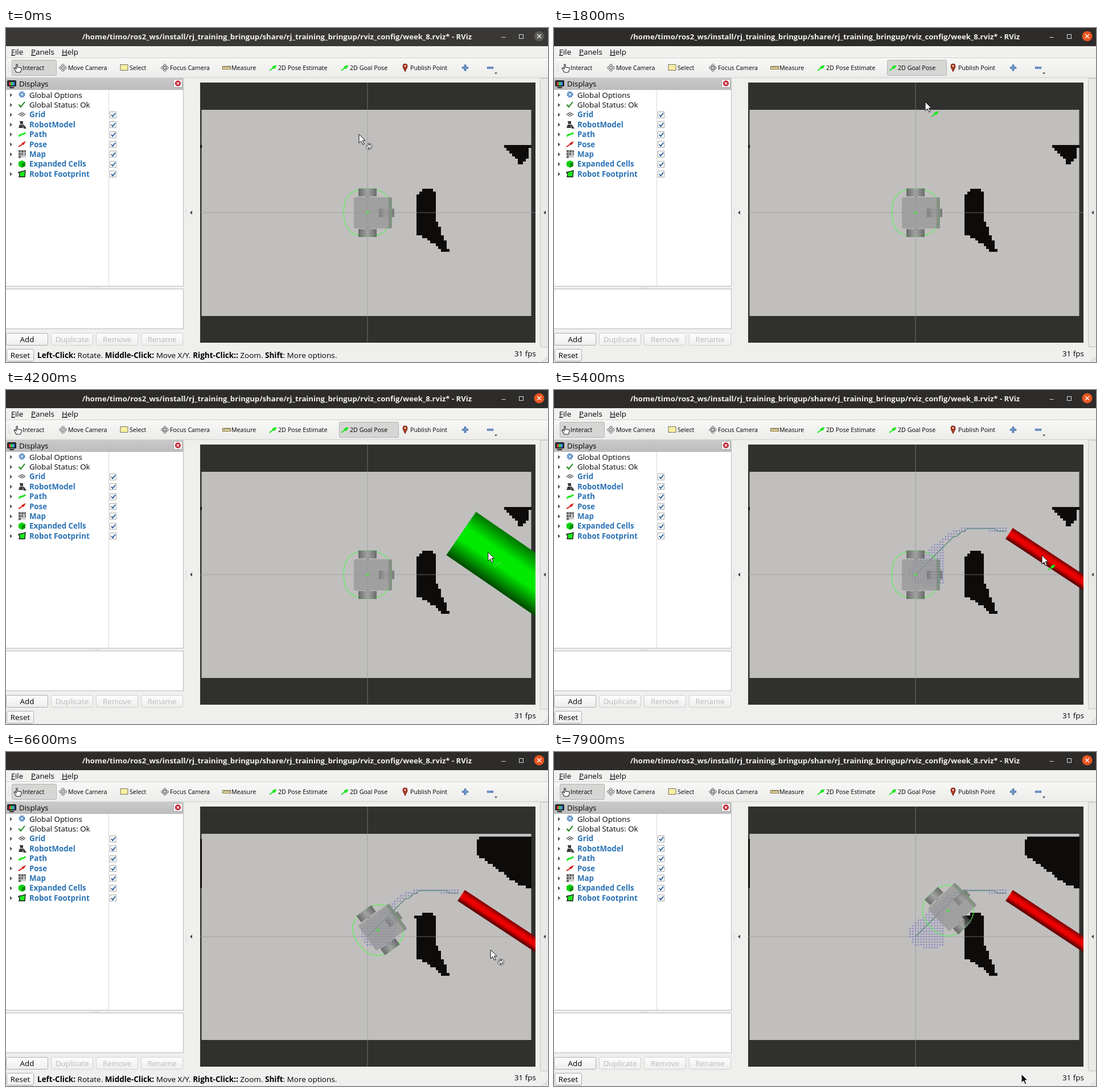
Write an HTML page that moves like this. It is 952 px wide and 588 px high and loops after 8000 ms.

```html
<!DOCTYPE html>
<html lang="en">
<head>
<meta charset="utf-8">
<title>Robot viewer</title>
<style>
html, body { margin: 0; width: 100%; height: 100%; overflow: hidden; background: #efefee; }
svg { display: block; width: 952px; height: 588px; }
text { font: 13.33px "Open Sans", "Noto Sans", sans-serif; fill: #000; white-space: pre; }
.small { font-size: 10.67px; }
.title { font-size: 13.15px; font-weight: 700; fill: #f2f1ef; }
.tip { font-size: 13.5px; }
.b { font-weight: 700; }
.link { font-weight: 700; fill: #2a72b5; }
.off { fill: #b9b9b9; }
.mid { text-anchor: middle; }
.u { text-decoration: underline; }
.crisp { shape-rendering: crispEdges; }
</style>
</head>
<body>
<svg viewBox="0 0 952 588" xmlns="http://www.w3.org/2000/svg">
  <defs>
    <clipPath id="viewClip"><rect x="341" y="96" width="589" height="458"/></clipPath>
    <linearGradient id="bar" x2="0" y2="1"><stop stop-color="#f8f8f7"/><stop offset="1" stop-color="#ececeb"/></linearGradient>
    <linearGradient id="btn" x2="0" y2="1"><stop stop-color="#fdfdfd"/><stop offset="1" stop-color="#eeeeed"/></linearGradient>
    <linearGradient id="head" x2="0" y2="1"><stop stop-color="#cacaca"/><stop offset="1" stop-color="#bcbcbc"/></linearGradient>
    <linearGradient id="wheel"><stop stop-color="#4b4b4b"/><stop offset=".5" stop-color="#9a9a9a"/><stop offset="1" stop-color="#4b4b4b"/></linearGradient>
    <linearGradient id="caster"><stop stop-color="#686868"/><stop offset=".45" stop-color="#929292"/><stop offset="1" stop-color="#606060"/></linearGradient>
    <linearGradient id="tube" x2="0" y2="1"><stop stop-opacity=".5"/><stop offset=".35" stop-opacity="0"/><stop offset=".6" stop-opacity="0"/><stop offset="1" stop-opacity=".7"/></linearGradient>
    <g id="pose"><path d="M-6 5L6-4" stroke="#1ee61e" stroke-width="2"/><path d="M-2-1L2-4 6-4 4 1 1 2z" fill="#1ee61e"/></g>
    <path id="arrow" d="M0 0V15.5L3.7 12 6.6 18.2 9 17 6.2 11H11z"/>
    <path id="cross" d="M0-7l3 3h-2v3h3v-2l3 3-3 3v-2h-3v3h2l-3 3-3-3h2v-3h-3v2l-3-3 3-3v2h3v-3h-2z" fill="#eee" stroke="#666"/>
  </defs>

  <rect width="952" height="588" fill="#efefee"/>
  <rect id="titleBar" width="952" height="32"/>
  <text class="title mid" x="476" y="20">/home/timo/ros2_ws/install/rj_training_bringup/share/rj_training_bringup/rviz_config/week_8.rviz* - RViz</text>
  <path d="M870.500 16.500h7" stroke="#ddd"/>
  <rect x="901.500" y="11.500" width="7" height="7" fill="none" stroke="#ddd"/>
  <circle id="close" cx="936.500" cy="14.500" r="9"/>
  <path d="M933 11l7 7m0-7l-7 7" stroke="#fff" stroke-width="1.300"/>
  <rect y="32" width="952" height="21" fill="#f1f1f0"/>
  <text x="9" y="46.500"><tspan class="u">F</tspan>ile</text>
  <text x="44" y="46.500"><tspan class="u">P</tspan>anels</text>
  <text x="98" y="46.500"><tspan class="u">H</tspan>elp</text>
  <rect y="52" width="952" height="35" fill="url(#bar)"/>
  <path d="M0 52.500H952M0 87.500H952" stroke="#cfcfce"/>
  <path d="M4.500 61v18M7.500 61v18" stroke="#bbb" stroke-dasharray="1 2"/>
  <g id="buttons" stroke="#b3b3b3"></g>
  <g id="tools">
    <path d="M17 76l-3-5 2-1 2 2v-8h2v5l7 1v4l-2 4h-7z" fill="#fff" stroke="#222" stroke-width="1.100"/>
    <use href="#cross" x="100" y="70"/>
    <use href="#cross" x="279" y="70"/>
    <circle cx="279" cy="70" r="3.500" fill="none" stroke="#777"/>
    <rect x="201" y="64.500" width="13" height="10" fill="#f7f0a0" stroke="#333" stroke-dasharray="2 1"/>
    <rect x="380.500" y="67.500" width="14" height="5" fill="#ead9a0" stroke="#77683a"/>
    <path d="M383 69h10" stroke="#554" stroke-width="2" stroke-dasharray="1 2"/>
    <use href="#pose" x="469" y="70"/>
    <use href="#pose" x="595" y="70"/>
    <path d="M701 77C699 72 697 70 697 67a4 4 0 0 1 8 0c0 3-2 5-4 10z" fill="#a83a20" stroke="#7c2412"/>
    <circle cx="701" cy="67" r="1.400" fill="#fff"/>
    <path d="M801 70h11m-5.500-5.500v11M845 70h11" stroke="#3465a4" stroke-width="3.600"/>
    <path d="M802 70h9m-4.500-4.500v9M846 70h9" stroke="#86a9d6" stroke-width="1.300"/>
    <path d="M858 78.500h5l-2.500 3z" fill="#444"/>
  </g>

  <g id="panel">
    <rect y="88" width="312" height="21" fill="url(#head)"/>
    <rect x="2.500" y="92.500" width="15" height="10" rx="1" fill="#1c2a33" stroke="#222"/>
    <path d="M5 98h3" stroke="#e33" stroke-width="6"/><path d="M8 98h4" stroke="#3c5" stroke-width="6"/><path d="M12 98h3" stroke="#48f" stroke-width="6"/>
    <path d="M6 105h8" stroke="#222" stroke-width="2"/>
    <text x="23" y="103">Displays</text>
    <rect x="294.500" y="90.500" width="15" height="14" rx="2" fill="#f6f6f6" stroke="#aaa"/>
    <circle cx="302" cy="97.500" r="5" fill="#c3202f"/><path d="M300 95.500l4 4m0-4l-4 4" stroke="#fff" stroke-width="1.200"/>
    <rect x="-.5" y="108.500" width="312" height="346" fill="#fff" stroke="#b9b9b8"/>
    <path d="M180.500 109v345" stroke="#d9d9d9"/>
    <path d="M149 457.500h16" stroke="#aaa" stroke-dasharray="1 2"/>
    <rect x="-.5" y="459.500" width="312" height="70" fill="#fff" stroke="#b9b9b8"/>
    <circle cx="28" cy="117" r="4.200" fill="#dce9f7" stroke="#4a80bd" stroke-width="2.600" stroke-dasharray="2.400 .9"/>
    <circle cx="28" cy="117" r="2.600" fill="#dce9f7" stroke="#4a80bd"/>
    <path d="M22.500 135l3.500 4 7-9" fill="none" stroke="#178417" stroke-width="2"/>
    <path d="M22 152l6-3.500 6 3.500-6 3.500zM25 150.200l6 3.500m0-3.500l-6 3.500" fill="none" stroke="#444"/>
    <path d="M24 164h6v5h-5zM22 176l2-6h5l1 6zM29 169l3 2 4 6h-5z" fill="#3a3a3a"/>
    <path d="M23 191c3-7 6 0 11-7" fill="none" stroke="#1ee61e" stroke-width="3"/>
    <path d="M22 209l8-5" stroke="#d21010" stroke-width="2"/><path d="M27 203l8-4-4 7z" fill="#d21010"/>
    <path d="M22 215h13v13h-13z" fill="#ccc"/>
    <path d="M22 217h13M22 222h8M22 227h5M33 222h2" stroke="#6a6a6a" stroke-width="4" stroke-dasharray="4 1"/>
    <path d="M22 236l6-3 6 3v7l-6 3-6-3z" fill="#0bd00b"/><path d="M28 239l6-3v7l-6 3z" fill="#078a07"/>
    <path d="M22 254l5-1 7-2-1 11H23l1-4z" fill="#1ee61e" stroke="#111" stroke-width="1.300"/>
  </g>

  <path d="M316.500 319v13" stroke="#aaa" stroke-dasharray="1 2"/>
  <rect x="938.500" y="88.500" width="14" height="473" rx="2" fill="#e9e9e8" stroke="#c2c2c1"/>
  <path d="M327 321.500v7l-4-3.500zM948 321.500v7l-4-3.500z" fill="#444"/>

  <g clip-path="url(#viewClip)">
    <rect x="340" y="96" width="590" height="458" fill="#30302f"/>
    <rect x="343.500" y="144" width="579" height="363" fill="#c0bfbe"/>
    <path id="cells" class="crisp" fill="#0d0c0b"/>
    <path d="M340 325H930M635 96V554" stroke="#929292" stroke-opacity=".65"/>
    <g id="plan">
      <path id="dots" fill="#7c7cc8" fill-opacity=".65"/>
      <path d="M635 325L702 258H707L716 249.500H720L726 244H774L779 248.500H794" fill="none" stroke="#4b8068" stroke-width="1.200"/>
    </g>
    <g id="robot">
      <path id="foot" fill="none" stroke="#55f455" stroke-width="1.500" stroke-dasharray="4 1"/>
      <g opacity=".72">
        <path d="M-2-30h5v5h-5zM-2 25h5v5h-5z" fill="#777"/>
        <rect x="-16" y="-42.500" width="32" height="14" fill="url(#wheel)"/>
        <rect x="-16" y="29" width="32" height="14" fill="url(#wheel)"/>
        <rect x="-24" y="-27" width="67" height="55" rx="3" fill="#959595"/>
        <path d="M37-27h3q3 0 3 3v49q0 3-3 3h-3z" fill="#747d74"/>
        <rect x="20" y="-7" width="27" height="15" fill="url(#caster)"/>
      </g>
      <path d="M42.500-9V10" stroke="#69d469" stroke-opacity=".5" stroke-dasharray="3 2"/>
      <circle r="2" fill="#8d8" stroke="#3fcf3f" stroke-width="1.200"/>
    </g>
    <g id="goal"><rect id="shaft" width="460"/><rect id="shade" width="460" fill="url(#tube)"/></g>
  </g>

  <text id="help" class="tip" x="55" y="581"><tspan class="b">Left-Click:</tspan> Rotate. <tspan class="b">Middle-Click:</tspan> Move X/Y. <tspan class="b">Right-Click::</tspan> Zoom. <tspan class="b">Shift</tspan>: More options.</text>
  <text id="hint" class="tip" x="55" y="581">Click and drag mouse to set position/orientation.</text>
  <text x="893" y="578">31 fps</text>
  <path d="M943 587l8-8m-4 8l4-4" stroke="#bbb"/>

  <g id="cursor">
    <use id="pointer" href="#arrow"/>
    <use id="poseIcon" href="#pose" x="17" y="21"/>
    <g id="orbit" transform="translate(18 21.500)">
      <circle r="5.500" fill="#eee" stroke="#555"/>
      <path d="M-3 1A3 3 0 0 1 1-3M3-1A3 3 0 0 1-1 3" fill="none" stroke="#444" stroke-width="1.300"/>
      <path d="M0-5l3 2-3 2zM0 5l-3-2 3-2z" fill="#444"/>
    </g>
  </g>
</svg>
<script>
const $ = id => document.getElementById(id);
const set = (node, attrs) => { for (const k in attrs) node.setAttribute(k, attrs[k]); };
const show = (id, on) => { $(id).style.display = on ? "" : "none"; };
const clamp = v => Math.min(1, Math.max(0, v));

function add(parent, tag, attrs, text = "") {
  const node = document.createElementNS("http://www.w3.org/2000/svg", tag);
  set(node, attrs);
  node.textContent = text;
  $(parent).append(node);
}

// Toolbar, tree and buttons
const PRESSED = "#d6d6d5", HOVER = "#f7f7f6";
add("buttons", "rect", { id: "interact", x: 10.5, y: 56.5, width: 78, height: 27, rx: 2, fill: PRESSED });
add("buttons", "rect", { id: "goalTool", x: 585.5, y: 56.5, width: 104, height: 27, rx: 2 });

const tools = { "Interact": 29, "Move Camera": 109, "Select": 217, "Focus Camera": 288, "Measure": 396,
  "2D Pose Estimate": 478, "2D Goal Pose": 604, "Publish Point": 710 };
for (const name in tools) add("tools", "text", { x: tools[name], y: 74, class: "small" }, name);

["Global Options", "Global Status: Ok", "Grid", "RobotModel", "Path", "Pose", "Map", "Expanded Cells", "Robot Footprint"]
  .forEach((name, i) => {
    const y = 118 + 17.4 * i;
    add("panel", "path", { d: `M7 ${y - 3.5}v7l4-3.500z`, fill: "#555" });
    add("panel", "text", { x: 41, y: y + 4.5, class: i > 1 ? "link" : "" }, name);
    if (i < 2) return;
    add("panel", "rect", { x: 182.5, y: Math.round(y) - 5.5, width: 11, height: 11, fill: "#fff", stroke: "#aaa" });
    add("panel", "path", { d: `M185 ${y}l2.500 3 4.500-6`, fill: "none", stroke: "#245a96", "stroke-width": 1.8 });
  });

function pushButton(label, x, y, w, cls) {
  add("panel", "rect", { x: x + .5, y: y + .5, width: w, height: 21, rx: 2, fill: "url(#btn)", stroke: cls ? "#cfcfce" : "#acacab" });
  add("panel", "text", { x: x + w / 2 + .5, y: y + 15.5, class: "mid " + cls }, label);
}
["Add", "Duplicate", "Remove", "Rename"].forEach((s, i) => pushButton(s, 79 * i, 537, 73, i ? "off" : ""));
pushButton("Reset", 1, 565, 47, "");

// Outlines are filled with the square cells whose centres they contain
const CELL = 4.8;

function inside(poly, x, y) {
  let hit = false;
  poly.forEach(([ax, ay], i) => {
    const [bx, by] = poly[(i + 1) % poly.length];
    if (ay > y !== by > y && x < ax + (bx - ax) * (y - ay) / (by - ay)) hit = !hit;
  });
  return hit;
}

function raster(poly, ox, oy) {
  const xs = poly.map(p => p[0]), ys = poly.map(p => p[1]), found = [];
  const snap = (v, o) => o + Math.floor((v - o) / CELL) * CELL;
  for (let y = snap(Math.min(...ys), oy); y <= Math.max(...ys); y += CELL)
    for (let x = snap(Math.min(...xs), ox); x <= Math.max(...xs); x += CELL)
      if (inside(poly, x, y)) found.push({ x, y });
  return found;
}

const box = (x0, y0, x1, y1) => `M${x0} ${y0}H${x1}V${y1}H${x0}z`;
const H = CELL / 2;
const mapCells = poly => raster(poly, 721 + H, 206.4 + H);
const squares = list => list.map(({ x, y }) => box(x - H, y - H, x + H, y + H)).join("");

const block = squares(mapCells([[721, 292], [735, 283], [745, 283], [755, 292], [756, 338], [778, 393], [769, 393], [726, 363], [721, 363]]));
const ledge = box(716.5, 287.5, 755, 293);
const nearCorner = squares(mapCells([[869, 206], [923, 206], [923, 211], [917, 211], [917, 228], [908, 240], [903, 240], [878, 211]]));
const corner = mapCells([[836, 148], [918, 148], [923, 154], [923, 240], [904, 236], [827, 180], [827, 154]]);

let seed = 7;
const random = () => (seed = seed * 16807 % 2147483647) / 2147483647;
corner.forEach(c => { c.need = c.y < 180 ? random() : 0; });

function mapPath(t) {
  const known = t < 5700 ? 0 : clamp((t - 5600) / 600);
  const wall = box(341, 206 - 53 * known, 344, 211 + 28 * known);
  return block + wall + (known ? squares(corner.filter(c => c.need < known)) : nearCorner) + (t < 6000 ? "" : ledge);
}

// Searched cells: a disc around the start and a band along the way
const searched = [[623, 312], [632, 302], [692, 252], [716, 242], [796, 242], [796, 250], [762, 250], [762, 245],
  [732, 245], [714, 252], [686, 266], [686, 342], [668, 346], [653, 346], [633, 341], [623, 324]];
set($("dots"), { d: raster(searched, 635, 325).map(({ x, y }) =>
  `M${x - 1.6} ${y}a1.600 1.600 0 1 0 3.200 0a1.600 1.600 0 1 0-3.200 0`).join("") });

const ring = Array.from({ length: 36 }, (_, i) => {
  const a = i * Math.PI / 18, r = 43.4 - 1.6 * Math.cos(4 * a);
  return `${(r * Math.cos(a)).toFixed(2)} ${(r * Math.sin(a)).toFixed(2)}`;
});
set($("foot"), { d: `M${ring.join("L")}z` });

// Pointer stops: time, x, y
const stops = [[100, 620, 187], [800, 650, 68], [1600, 650, 68], [1800, 652, 130], [1900, 680, 162], [2600, 785, 305],
  [2900, 814, 254], [3500, 798, 252], [4000, 840, 282], [4500, 857, 291], [6200, 857, 291], [7100, 844, 420], [7900, 821, 567]];

function mouse(t) {
  const i = Math.max(1, stops.findIndex(s => s[0] >= t));
  const [t0, x0, y0] = stops[i - 1], [t1, x1, y1] = stops[i];
  const f = clamp((t - t0) / (t1 - t0));
  return [x0 + (x1 - x0) * f, y0 + (y1 - y0) * f];
}

// The robot turns towards the path first, then speeds up to 40 px/s
function robotPose(t) {
  const s = Math.max(0, t / 1000 - 5.4), w = s - .675;
  const turn = -45 * Math.tanh(s / 1.1);
  const way = s && 20 * (w + Math.hypot(w, .2)), dir = .88 * turn * Math.PI / 180;
  return `translate(${635 + way * Math.cos(dir)} ${325 + way * Math.sin(dir)}) rotate(${turn})`;
}

function draw(t) {
  const [mx, my] = mouse(t);
  const inView = my > 96 && my < 554, focused = t >= 1000;
  const goalTool = t >= 1100 && t < 5400, planned = t >= 5400;
  const posing = t >= 1100 && t < 6300;

  set($("titleBar"), { fill: focused ? "#2d2c2b" : "#393837" });
  set($("close"), { fill: focused ? "#e95420" : "#5a5957" });
  show("interact", !goalTool);
  show("goalTool", goalTool || t >= 700 && t < 1100);
  set($("goalTool"), { fill: goalTool ? PRESSED : HOVER });

  set($("cells"), { d: mapPath(t) });
  show("plan", planned);
  set($("robot"), { transform: robotPose(t) });

  const [gx, gy] = mouse(Math.min(t, 4500));
  const heading = Math.atan2(gy - 252, gx - 798) * 180 / Math.PI;
  const half = planned ? 11.5 : 46, size = { y: -half, height: 2 * half };
  show("goal", t >= 3600);
  set($("goal"), { transform: `translate(799.500 252.500) rotate(${heading})` });
  set($("shaft"), { ...size, fill: planned ? "#ea0000" : "#00ea00" });
  set($("shade"), size);

  show("help", inView && !posing);
  show("hint", t >= 1100 && t < 1700);

  set($("cursor"), { transform: `translate(${mx} ${my})` });
  set($("pointer"), inView ? { fill: "#fff", stroke: "#111" } : { fill: "#111", stroke: "#fff" });
  show("poseIcon", inView && posing);
  show("orbit", inView && !posing);
}

const LOOP = 8000, STEP = 100;
const begin = performance.now();
let shown = -1;
function tick(now) {
  const t = Math.floor(Math.max(0, now - begin) % LOOP / STEP) * STEP;
  if (t !== shown) draw(shown = t);
  requestAnimationFrame(tick);
}
draw(0);
requestAnimationFrame(tick);
</script>
</body>
</html>
```
